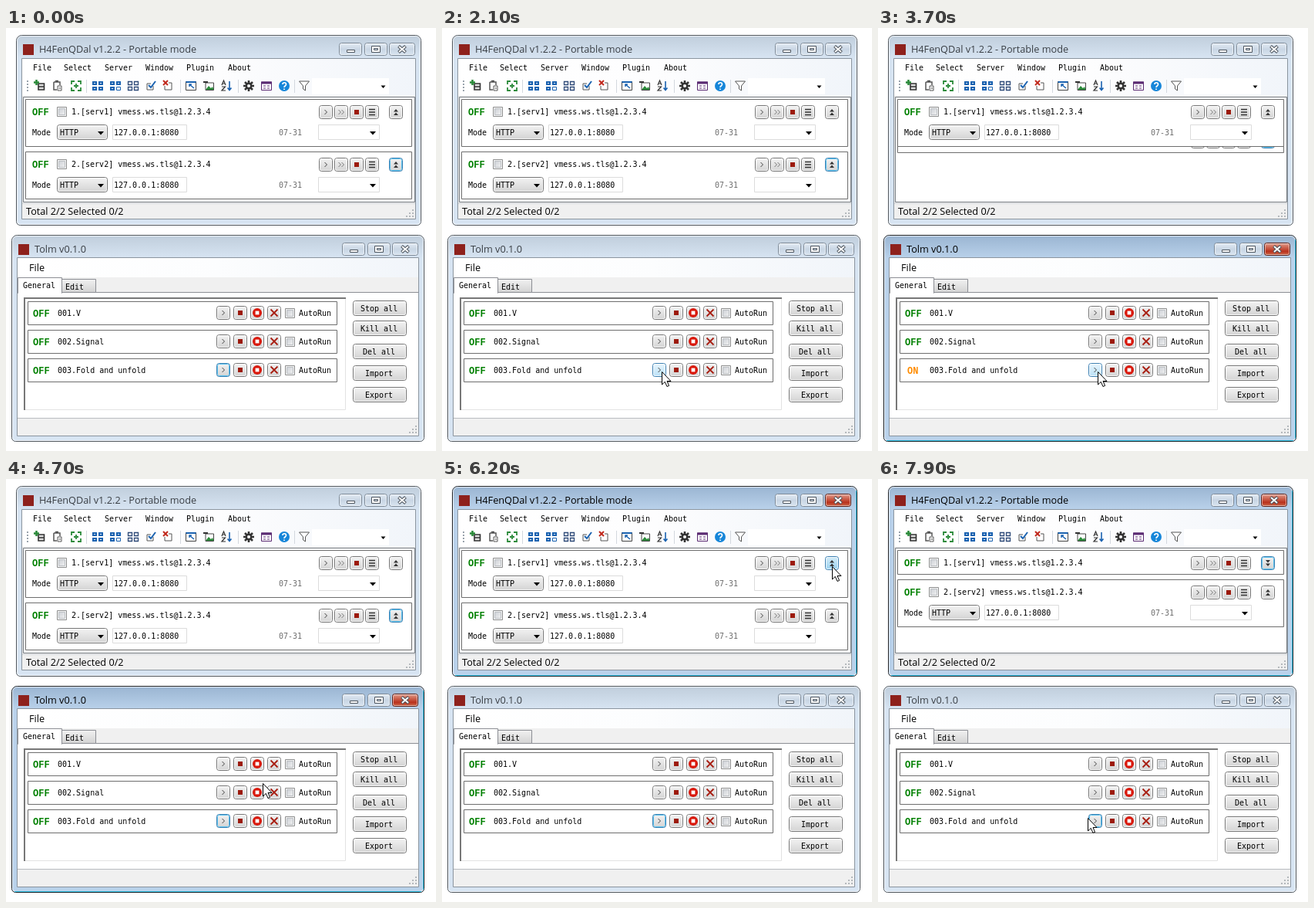
An HTML page with a canvas that plays this animation: 558x548 px, repeating every 8 s.

```html
<!DOCTYPE html>
<html lang="en">
<head>
<meta charset="utf-8">
<style>
  html, body { margin: 0; width: 558px; height: 548px; overflow: hidden; background: #fff; }
  canvas { display: block; }
</style>
</head>
<body>
<canvas id="stage" width="558" height="548"></canvas>
<script>
const ctx = document.getElementById('stage').getContext('2d');
const LOOP = 8000, TICK = 100;
const MONO = '10px "DejaVu Sans Mono", monospace';
const BOLD = 'bold 12px "Liberation Mono", monospace';
const UI = '12.7px "Open Sans", sans-serif';
const GREEN = '#2b8a3a', BLUE = '#1a62b0', RED = '#a81e12', DARK = '#333';

// Pointer waypoints: time, x, y
const TRAIL = [
  [900, 514, 450], [1100, 392, 449], [1400, 327, 442], [1700, 307, 443], [2100, 285, 445],
  [4600, 285, 445], [4700, 333, 394], [5000, 448, 220], [5300, 500, 128], [5500, 489, 119],
  [6000, 506, 113], [6600, 506, 113], [6700, 503, 117], [6800, 490, 142], [7200, 340, 320],
  [7500, 282, 410], [7600, 280, 424], [7700, 270, 434], [7900, 272, 439]
];

const GLYPHS = {
  play: [['M-1.5-3L1.5 0L-1.5 3', '#444']],
  step: [['M-3.5-3L-.5 0L-3.5 3M.5-3L3.5 0L.5 3', '#777']],
  stop: [['M-3-3H3V3H-3Z', 0, '#9c1a0c']],
  menu: [['M-4-3.5H4M-4 0H4M-4 3.5H4', DARK, 0, 1.6]],
  up: [['M-3-.5L0-4L3-.5ZM-3 4L0 .5L3 4Z', 0, DARK]],
  down: [['M-3-4L0-.5L3-4ZM-3 .5L0 4L3 .5Z', 0, DARK]],
  record: [['M-6 0A6 6 0 1 1 6 0A6 6 0 1 1-6 0', 0, '#d9180c'], ['M-2.4-2.4H2.4V2.4H-2.4Z', 0, '#fff']],
  cross: [['M-4.5-4.5L4.5 4.5M4.5-4.5L-4.5 4.5', RED, 0, 1.8]],
  close: [['M-4.5-4L4.5 4M4.5-4L-4.5 4', '#4a525b', 0, 4], ['M-4-3.5L4 3.5M4-3.5L-4 3.5', '#fff', 0, 2]],
  arrow: [['M-4-2H4L0 2.5Z', 0, '#000']],
  pointer: [['M.5.5V17L4.3 13.4L7 19.5L9.6 18.4L7 12.5H12Z', '#000', '#fff']],
  move: [['M0-9L4-5H1.5V.5H7V-2L11 2L7 6V3.5H1.5V9H4L0 13L-4 9H-1.5V3.5H-7V6L-11 2L-7-2V.5H-1.5V-5H-4Z', '#222', '#fff']]
};

const TOOLS = [
  [44, ['M-2-3H5.5V5H-2ZM-2 1H5.5', DARK, '#ddd', 1.6], ['M-4.5-8V-1M-8-4.5H-1', GREEN, 0, 2.6]],
  [67, ['M-5-5H3V-1M-5-5V5H-1M-3-6.5H1', '#555', 0, 1.5], ['M0 0H5V6H0ZM1.5 3H4', '#555', '#fff']],
  [91, ['M-6-2V-6H-2M2-6H6V-2M6 2V6H2M-2 6H-6V2M-3 0H3M0-3V3', GREEN, 0, 1.8]],
  [119, ['M-7-6H-1V-1H-7ZM1-6H7V-1H1ZM-7 1H-1V6H-7ZM1 1H7V6H1Z', 0, BLUE], ['M-5-3.5H-3M3-3.5H5M-5 3.5H-3M3 3.5H5', '#fff']],
  [142, ['M-7-6H-1V-1H-7ZM1-6H7V-1H1ZM-7 1H-1V6H-7Z', 0, BLUE], ['M-5-3.5H-3M3-3.5H5M-5 3.5H-3', '#fff'], ['M1.5 1.5H6.5V5.5H1.5Z', BLUE]],
  [165, ['M-6.5-5.5H-1.5V-1.5H-6.5ZM1.5-5.5H6.5V-1.5H1.5ZM-6.5 1.5H-1.5V5.5H-6.5ZM1.5 1.5H6.5V5.5H1.5Z', '#2e4a78', 0, 1.3]],
  [188, ['M3 0V5H-5V-3H0', '#555'], ['M-3-1L0 2L6-6', BLUE, 0, 2]],
  [211, ['M4-4V5H-5V0M0-4H4', '#555'], ['M-7-7L-1-1M-1-7L-7-1', '#c0281c', 0, 2]],
  [240, ['M-6.5-5.5H6.5V5.5H-6.5Z', '#444', '#fff'], ['M-6.5-5H6.5', BLUE, 0, 2], ['M4 3L-2-2M-2 1V-2H1', BLUE, 0, 1.5]],
  [263, ['M-4-4H6.5V5.5H-4Z', '#444', '#fff'], ['M-4 5L0 0L3 3L5 1L6.5 5Z', 0, GREEN], ['M-7-5H-1', DARK, 0, 2]],
  [286, ['M4-6V5M1.5 2.5L4 5.5L6.5 2.5', BLUE, 0, 1.6], ['M-6-1L-3.5-7L-1-1M-5-3H-2M-6 1H-1.5L-6 6H-1', DARK, 0, 1.2]],
  [315, ['M0-7V7M-7 0H7M-5-5L5 5M5-5L-5 5', DARK, 0, 2.6], ['M-4.5 0A4.5 4.5 0 1 1 4.5 0A4.5 4.5 0 1 1-4.5 0', 0, DARK],
    ['M-2 0A2 2 0 1 1 2 0A2 2 0 1 1-2 0', 0, '#fff']],
  [338, ['M-6.5-5H6.5V5.5H-6.5Z', '#5a2a72', '#fff'], ['M-7-4H7', '#5a2a72', 0, 3], ['M-4 0H-1M1 0H4M-4 3H-1M1 3H4', '#5a2a72']],
  [361, ['M-7 0A7 7 0 1 1 7 0A7 7 0 1 1-7 0', 0, '#1686d9'], ['M-2-2C-2-5 2.5-5 2.5-2C2.5 0 0 0 0 2M0 3.5V5', '#fff', 0, 1.7]],
  [387, ['M-6.5-6H6.5L1.5 0V6L-1.5 4V0Z', '#555', '#fff']]
];

let pointer;

function ramp(x0, y0, x1, y1, ...colors) {
  const g = ctx.createLinearGradient(x0, y0, x1, y1);
  colors.forEach((c, i) => g.addColorStop(i / (colors.length - 1), c));
  return g;
}

function box(x, y, w, h, fill, stroke, radius = 0) {
  ctx.beginPath();
  ctx.roundRect(x + .5, y + .5, w - 1, h - 1, radius);
  if (fill) { ctx.fillStyle = fill; ctx.fill(); }
  if (stroke) { ctx.lineWidth = 1; ctx.strokeStyle = stroke; ctx.stroke(); }
}

function rect(x, y, w, h, fill) {
  ctx.fillStyle = fill;
  ctx.fillRect(x, y, w, h);
}

function text(s, x, y, font = MONO, color = '#000') {
  ctx.font = font;
  ctx.fillStyle = color;
  ctx.fillText(s, x, y);
}

function draw(shapes, x, y) {
  ctx.save();
  ctx.translate(x, y);
  for (const [d, stroke, fill, width = 1] of shapes) {
    const p = new Path2D(d);
    if (fill) { ctx.fillStyle = fill; ctx.fill(p); }
    if (stroke) { ctx.strokeStyle = stroke; ctx.lineWidth = width; ctx.stroke(p); }
  }
  ctx.restore();
}

function button(x, y, w, h, { focus, pressed } = {}) {
  const hover = pointer && pointer.x >= x && pointer.x < x + w && pointer.y >= y && pointer.y < y + h;
  const colors = hover ? (pressed ? ['#d8eef9', '#98d1ef'] : ['#eaf6fd', '#b8e0f7']) : ['#f4f4f4', '#d2d2d2'];
  box(x, y, w, h, ramp(0, y, 0, y + h, ...colors), hover || focus ? '#3c7fb1' : '#757575', 3);
  box(x + 1, y + 1, w - 2, h - 2, null, focus && !hover ? '#5cc4f0' : 'rgba(255,255,255,.8)', 2);
}

function glyphButton(cx, cy, glyph, state) {
  button(cx - 9, cy - 9, 18, 18, state);
  draw(GLYPHS[glyph], cx, cy);
}

function checkbox(cx, cy) {
  box(cx - 6, cy - 6, 13, 13, '#f4f4f4', '#8e8f8f');
  box(cx - 4, cy - 4, 9, 9, ramp(cx - 4, cy - 4, cx + 5, cy + 5, '#cbcfd5', '#f2f2f2'), '#bcc0c4');
}

function grip(x, y) {
  for (let i = 0; i < 3; i++)
    for (let j = 0; j <= i; j++) rect(x - j * 4, y - (2 - i) * 4, 2, 2, '#b4b8bc');
}

function appWindow(x, y, w, h, title, active) {
  const colors = active ? ['#99b4d1', '#b9d1ea'] : ['#bfcddb', '#d7e4f2'];
  const r = x + w, top = y + 10;
  box(x, y, w, h, ramp(0, y, 0, y + 30, ...colors), active ? '#1c2126' : '#4e555c', [7, 7, 5, 5]);
  box(x + 1, y + 1, w - 2, h - 2, null, 'rgba(255,255,255,.75)', [6, 6, 4, 4]);
  if (active) {
    rect(r - 2, y + 6, 1, h - 10, '#35c4e6');
    rect(x + 4, y + h - 2, w - 8, 1, '#35c4e6');
  }
  rect(x + 9, y + 12, 14, 14, '#8e211c');
  text(title, x + 30, y + 23, UI, active ? '#000' : '#3a3f45');
  for (const [left, width] of [[r - 107, 30], [r - 74, 30], [r - 42, 34]]) {
    const red = active && width > 30;
    box(left, top, width, 17, red ? ramp(0, top, 0, top + 17, '#e6ab9d', '#cf6a56', '#b9321d', '#d0704f')
      : ramp(0, top, 0, top + 17, '#e6edf5', '#c9d6e4', '#d9e5f1'), red ? '#5c2018' : '#7c8997', 3);
    box(left + 1, top + 1, width - 2, 15, null, 'rgba(255,255,255,.5)', 2);
  }
  box(r - 97, top + 9, 11, 4, '#fff', '#4e565f');
  box(r - 65, top + 4, 12, 9, '#fff', '#4e565f');
  box(r - 62, top + 7, 6, 3, '#cfdbe8', '#4e565f');
  draw(GLYPHS.close, r - 25, top + 8.5);
}

function server(n, top, folded, glyph, state) {
  box(25, top, 502, folded ? 32 : 62, '#fff', '#6e6e6e');
  const y = top + 17;
  text('OFF', 34, y + 4, BOLD, '#008000');
  checkbox(72, y - 1);
  text(`${n}.[serv${n}] vmess.ws.tls@1.2.3.4`, 85, y + 3);
  ['play', 'step', 'stop', 'menu'].forEach((g, i) => glyphButton(415 + 20 * i, y, g));
  glyphButton(506, y, glyph, state);
  if (folded) return;
  text('Mode', 34, y + 30);
  button(66, y + 16, 66, 20);
  text('HTTP', 70, y + 30);
  draw(GLYPHS.arrow, 123, y + 27);
  box(138, y + 16, 97, 20, '#fff', '#dcdcdc');
  text('127.0.0.1:8080', 140, y + 30);
  text('07-31', 354, y + 30, MONO, '#6d6d6d');
  box(405, y + 16, 80, 20, '#fff', '#dcdcdc');
  draw(GLYPHS.arrow, 476, y + 27);
}

function serverWindow(t) {
  const clicked = t >= 6300, within = (a, b) => t >= a && t < b;
  appWindow(13, 9, 526, 247, 'H4FenQDal v1.2.2 - Portable mode', t >= 6200);
  box(20, 39, 512, 209, '#f0f0f0', '#8b959f');
  rect(21, 40, 510, 48, ramp(21, 0, 531, 0, '#fff', '#fdfdfe', '#f1f5fa'));
  ['File', 'Select', 'Server', 'Window', 'Plugin', 'About'].forEach((s, i) =>
    text(s, [35, 75, 128, 181, 234, 288][i], 55));
  for (let y = 68; y < 84; y += 4) rect(27, y, 2, 2, '#9aa3ad');
  for (const x of [104, 226, 301, 374]) rect(x, 67, 1, 17, '#d3d8de');
  for (const [x, ...shapes] of TOOLS) draw(shapes, x, 75);
  rect(397, 65, 100, 21, '#fff');
  draw([['M-3-1.5H3L0 2Z', 0, '#000']], 489.5, 76);

  box(22, 89, 509, 137, '#fff', '#747a80');
  const packed = within(2900, 3800) || clicked;
  server(2, packed ? 130 : 160, within(2900, 3800), within(2900, 3800) ? 'down' : 'up', { focus: t < 6200 });
  server(1, 92, within(2800, 3700) || clicked, within(2900, 3700) || clicked ? 'down' : 'up',
    { focus: t >= 6200, pressed: within(6200, 6300) });
  rect(21, 227, 510, 1, '#d5d8dc');
  text('Total 2/2 Selected 0/2', 26, 242, UI);
  grip(527, 243);
}

function scriptWindow(t) {
  appWindow(7, 268, 536, 268, 'Tolm v0.1.0', t >= 2300 && t < 6200);
  box(14, 297, 522, 232, '#fff', '#8b959f');
  rect(15, 298, 520, 45, ramp(15, 0, 535, 0, '#fff', '#fcfdfe', '#f1f5fa'));
  rect(15, 323, 520, 20, '#f0f0f0');
  text('File', 30, 315, UI);
  rect(15, 342, 520, 163, '#fff');
  rect(15, 342, 520, 1, '#8c8e94');
  box(72, 325, 45, 18, ramp(0, 325, 0, 343, '#f2f2f2', '#d2d2d2'), '#8c8e94');
  box(15, 323, 58, 21, '#fff', '#8c8e94');
  rect(16, 342, 56, 3, '#fff');
  text('General', 22, 337);
  text('Edit', 77, 339);

  box(23, 349, 418, 146, '#fff', '#e3e3e3');
  rect(23, 349, 418, 2, '#777');
  rect(23, 349, 2, 146, '#777');
  ['V', 'Signal', 'Fold and unfold'].forEach((name, i) => {
    const y = 369 + 37 * i, last = i === 2, on = last && t >= 2800 && t < 3800;
    box(28, y - 15, 402, 31, '#fff', '#6e6e6e');
    text(on ? 'ON' : 'OFF', on ? 38 : 35, y + 5, BOLD, on ? '#ff8c00' : '#008000');
    text(`00${i + 1}.${name}`, 67, y + 4);
    ['play', 'stop', 'record', 'cross'].forEach((g, k) => glyphButton(282 + 22 * k, y, g,
      { focus: last && !k, pressed: t >= 2300 && t < 2400 }));
    checkbox(368, y);
    text('AutoRun', 380, y + 4);
  });
  ['Stop all', 'Kill all', 'Del all', 'Import', 'Export'].forEach((s, i) => {
    const y = [363, 389, 419, 447, 475][i];
    button(450, y - 10, 70, 20);
    text(s, 484 - 3 * s.length, y + 4);
  });
  rect(15, 505, 520, 23, '#f0f0f0');
  rect(15, 505, 520, 1, '#b9bcc0');
  grip(531, 523);
}

function pointerAt(t) {
  if (t < TRAIL[0][0]) return null;
  const next = TRAIL.findIndex(p => p[0] > t);
  const b = TRAIL.at(next), a = next < 0 ? b : TRAIL[next - 1];
  const k = a === b ? 0 : (t - a[0]) / (b[0] - a[0]);
  return {
    x: Math.round(a[1] + (b[1] - a[1]) * k),
    y: Math.round(a[2] + (b[2] - a[2]) * k),
    visible: t < 6500 || t >= 6700,
    glyph: t >= 6700 && t < 6800 ? 'move' : 'pointer'
  };
}

function render() {
  const t = Math.floor(performance.now() % LOOP / TICK) * TICK;
  pointer = pointerAt(t);
  rect(0, 0, 558, 548, '#fff');
  serverWindow(t);
  scriptWindow(t);
  if (pointer?.visible) draw(GLYPHS[pointer.glyph], pointer.x, pointer.y);
  requestAnimationFrame(render);
}
render();
</script>
</body>
</html>
```
